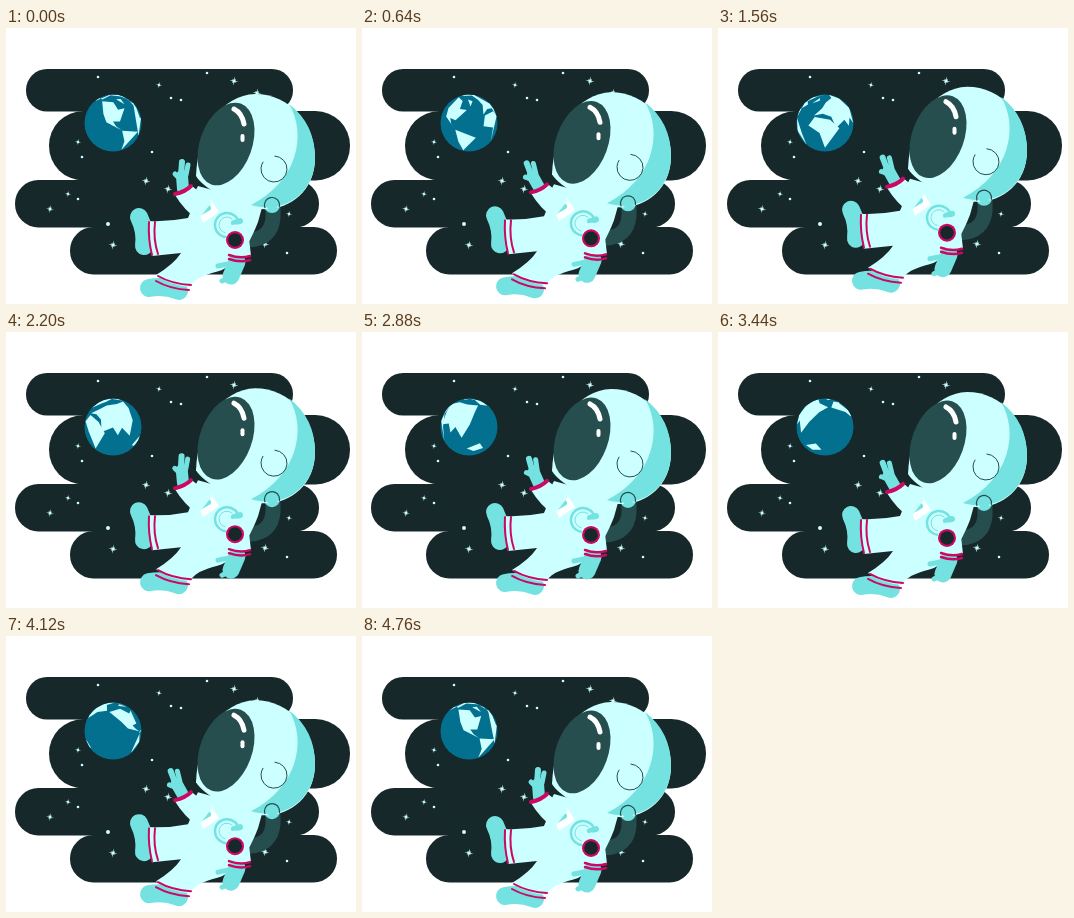
These frames come from a looping animation (350x276 px, 4800 ms). An HTML page with a canvas:

```html
<!DOCTYPE html>
<html lang="en">
<head>
<meta charset="utf-8">
<title>Waving astronaut</title>
<style>
html, body { margin: 0; width: 100%; height: 100%; overflow: hidden; background: #fff; }
canvas { display: block; }
</style>
</head>
<body>
<canvas id="stage" width="350" height="276"></canvas>
<script>
const ctx = document.getElementById('stage').getContext('2d');
const LOOP = 4800, TAU = Math.PI * 2, RAD = Math.PI / 180;
const LIGHT = '#ccffff', TEAL = '#74e2e1', NIGHT = '#162829', VISOR = '#264e4e',
      PINK = '#cc0862', OCEAN = '#04708f', WHITE = '#ffffff';

// Coastlines as longitude, latitude pairs
const northAmerica = [-166, 66, -95, 72, -80, 52, -56, 52, -81, 27, -97, 28, -90, 18, -79, 9, -112, 26, -124, 42];
const southAmerica = [-78, 8, -35, -7, -68, -52, -72, -18];
const greenland = [-60, 80, -22, 74, -43, 60];
const eurasia = [-9, 38, 10, 56, 25, 71, 105, 77, 178, 68, 140, 55, 121, 30, 104, 2,
                 88, 22, 78, 8, 68, 24, 44, 13, 36, 37, 14, 44];
const africa = [-6, 35, 32, 31, 51, 11, 20, -35, 9, 4, -17, 15];
const australia = [114, -24, 142, -12, 153, -28, 130, -33];

function fill(shape, color) {
  ctx.fillStyle = color;
  ctx.fill(new Path2D(shape));
}

function line(shape, color, width) {
  ctx.strokeStyle = color;
  ctx.lineWidth = width;
  ctx.stroke(new Path2D(shape));
}

function ellipse(x, y, rx, ry, turn, color) {
  ctx.fillStyle = color;
  ctx.beginPath();
  ctx.ellipse(x, y, rx, ry, turn, 0, TAU);
  ctx.fill();
}

function disc(x, y, r, color) {
  ellipse(x, y, r, r, 0, color);
}

function arc(x, y, r, from, to, color, width) {
  ctx.strokeStyle = color;
  ctx.lineWidth = width;
  ctx.beginPath();
  ctx.arc(x, y, r, from, to);
  ctx.stroke();
}

function band(left, top, right, bottom) {
  ctx.fillStyle = NIGHT;
  ctx.beginPath();
  ctx.roundRect(left, top, right - left, bottom - top + 0.5, (bottom - top) / 2);
  ctx.fill();
}

function star(x, y, r) {
  ctx.fillStyle = LIGHT;
  ctx.beginPath();
  for (let i = 0; i < 16; i++) {
    const reach = i % 2 ? r * 0.3 : i % 4 ? r * 0.6 : r;
    const a = i * TAU / 16 + 0.15;
    ctx.lineTo(x + reach * Math.cos(a), y + reach * Math.sin(a));
  }
  ctx.fill();
}

function drawSky(t) {
  band(20, 41, 287, 83);
  band(43, 83, 344, 152);
  band(9, 152, 313, 199);
  band(64, 199, 331, 246);
  const dots = [[92, 49], [165, 70], [175, 72], [201, 45], [76, 129], [146, 124], [72, 171], [281, 225]];
  const small = [[153, 57], [72, 114], [62, 166], [283, 186]];
  const large = [[228, 53], [251, 65], [140, 153], [162, 161], [107, 217], [259, 216]];
  dots.forEach(([x, y]) => disc(x, y, 1.3, LIGHT));
  disc(102, 196, 2, LIGHT);
  small.forEach(([x, y]) => star(x, y, 3.2));
  large.forEach(([x, y]) => star(x, y, 4.6));
  const twinkle = t > 600 && t < 1680 ? Math.sin((t - 600) / 1080 * Math.PI) ** 2 : 0;
  star(44, 181, 4 + 3 * twinkle);
}

// Orthographic globe, tilted north; hidden points slide along the rim
function drawLand(coast, spin) {
  const tilt = 25 * RAD;
  let visible = false;
  ctx.fillStyle = LIGHT;
  ctx.beginPath();
  for (let i = 0; i < coast.length; i += 2) {
    const lon = (coast[i] - spin) * RAD, lat = coast[i + 1] * RAD;
    const depth = Math.cos(lat) * Math.cos(lon);
    const x = Math.cos(lat) * Math.sin(lon);
    const y = depth * Math.sin(tilt) - Math.sin(lat) * Math.cos(tilt);
    const front = depth * Math.cos(tilt) + Math.sin(lat) * Math.sin(tilt) > 0;
    const scale = 28.5 / (front ? 1 : Math.hypot(x, y));
    visible ||= front;
    ctx.lineTo(107 + scale * x, 95 + scale * y);
  }
  if (visible) ctx.fill();
}

function drawEarth(t) {
  ctx.save();
  disc(107, 95, 28.5, OCEAN);
  ctx.clip();
  for (const coast of [northAmerica, southAmerica, greenland, eurasia, africa, australia])
    drawLand(coast, -97 + 360 * t / LOOP);
  ctx.restore();
}

function drawWave(t) {
  const phase = t / LOOP * 2 % 1;
  const k = Math.min(1, Math.max(0, (Math.min(phase, 1 - phase) - 0.06) / 0.2));
  ctx.save();
  ctx.translate(177, 161);
  ctx.rotate(-25 * RAD * k * k * (3 - 2 * k));
  line('M0 0L-1 -13', TEAL, 12);
  line('M-2 -13L-1 -27', TEAL, 6);
  line('M3 -14L5 -24M-4 -11L-8 -15', TEAL, 5);
  ctx.restore();
  fill('M169 167L186 158L206 174L192 192Q178 182 169 167Z', LIGHT);
  line('M169 166Q179 164 185 158', PINK, 4);
}

function drawBody() {
  // Hose
  line('M267 178V190Q265 211 243 212', VISOR, 15);
  // Boots
  line('M133 189Q140 203 138 218', TEAL, 18);
  line('M143 260Q158 257 173 263', TEAL, 18);
  // Suit and legs
  fill('M192 158C186 168 187 180 182 190Q162 194 142 193Q142 211 146 228L175 225Q168 236 150 247Q163 257 184 259C190 248 204 246 216 242C235 232 244 214 252 194L257 176Z', LIGHT);
  line('M143 194Q142 211 146 227M149 194Q147 211 152 226', PINK, 2);
  line('M152 248Q166 256 185 257M150 253Q164 261 183 262', PINK, 2);
  // Chest panel
  fill('M190 178L205 172L213 184L197 195Z', WHITE);
  line('M195 184L202 180', TEAL, 6);
  arc(221, 197, 12, 0.7, 5.7, TEAL, 2.5);
  arc(221, 197, 8, 1.3, 5.4, TEAL, 1);
  line('M228 195L234 193', TEAL, 6);
  // Lowered arm
  line('M231 234L225 248', TEAL, 17);
  line('M222 236L212 238M222 250L216 253', TEAL, 5);
  fill('M219 200Q232 192 242 202L245 228Q233 231 222 228Z', LIGHT);
  line('M223 227Q234 231 244 228M223 231Q234 235 244 232', PINK, 2.5);
  disc(229, 212, 9, PINK);
  disc(229, 212, 6.8, NIGHT);
}

function drawHelmet() {
  disc(266, 177, 8, TEAL);
  fill('M190 148C192 101 216 67 249 66C284 66 309 96 309 130C309 164 282 183 255 181C226 177 198 161 190 148Z', LIGHT);
  fill('M283 76C301 106 292 153 245 177C279 187 309 164 309 130Q309 96 283 76Z', TEAL);
  disc(266, 176, 6, TEAL);
  arc(266, 177, 7.5, 2.8, 6.5, VISOR, 1.2);
  ellipse(220, 116, 26, 43, 0.35, VISOR);
  line('M228 81Q236 85 238 96', WHITE, 5);
  line('M236.5 108V112', WHITE, 4);
  arc(268, 141, 13, -1.5, 3.7, VISOR, 1);
}

function frame(now) {
  const t = now % LOOP;
  ctx.clearRect(0, 0, 350, 276);
  ctx.lineCap = ctx.lineJoin = 'round';
  drawSky(t);
  drawEarth(t);
  ctx.save();
  ctx.translate(0, -5 * (1 - Math.cos(TAU * t / LOOP)));
  drawBody();
  drawWave(t);
  drawHelmet();
  ctx.restore();
  requestAnimationFrame(frame);
}
requestAnimationFrame(frame);
</script>
</body>
</html>
```
